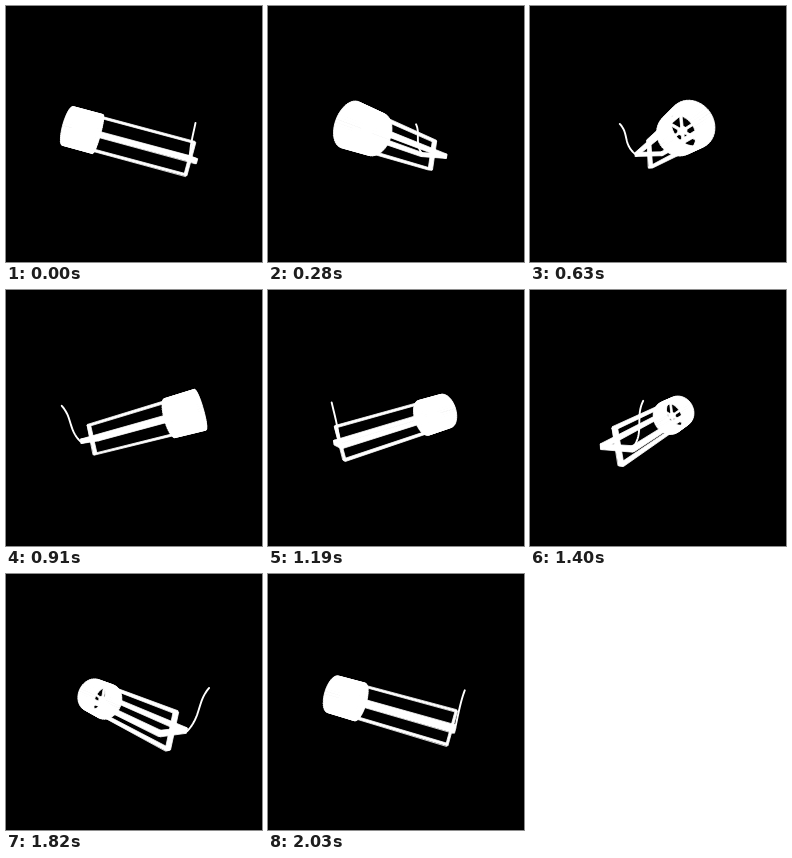
An HTML page with a canvas for the animation above (2100 ms loop, 256x256 px).

```html
<!DOCTYPE html>
<html lang="en">
<head>
<meta charset="utf-8">
<title>Rotating frame</title>
<style>
  html, body { margin: 0; width: 100%; height: 100%; overflow: hidden; background: #000; }
  canvas { display: block; width: 256px; height: 256px; }
</style>
</head>
<body>
<canvas id="stage" width="256" height="256"></canvas>
<script>
const ctx = document.getElementById('stage').getContext('2d');
const LOOP = 2100, STEP = 70, TURN = Math.PI * 2;
const CENTER = 128, CAMERA = 255;
const TILT = 15 * Math.PI / 180, COS = Math.cos(TILT), SIN = Math.sin(TILT);

// Axis coordinates (along, down, side) to world space.
const place = (s, v, w) => [-35 + s * COS - v * SIN, s * SIN + v * COS, 7 + w];

// Solid made of every combination of the given ranges.
function box([s0, s1], [v0, v1], [w0, w1]) {
  const points = [];
  for (const s of [s0, s1])
    for (const v of [v0, v1])
      for (const w of [w0, w1]) points.push(place(s, v, w));
  return points;
}

const polar = (s, r, a) => place(s, r * Math.sin(a), r * Math.cos(a));

function tube(start, end, outer, inner, count) {
  const parts = [];
  for (let i = 0; i < count; i++) {
    const points = [];
    for (const a of [i * TURN / count, (i + 1) * TURN / count])
      for (const s of [start, end])
        for (const r of [outer, inner]) points.push(polar(s, r, a));
    parts.push(points);
  }
  return parts;
}

function spoke(s, length, half, angle) {
  const dx = Math.cos(angle), dy = Math.sin(angle), points = [];
  for (const l of [-length, length])
    for (const h of [-half, half])
      for (const d of [-0.5, 0.5])
        points.push(place(s + d, l * dy + h * dx, l * dx - h * dy));
  return points;
}

function disc(s, depth, r) {
  const points = [];
  for (let i = 0; i < 16; i++)
    for (const d of [-depth, depth]) points.push(polar(s + d, r, i * TURN / 16));
  return points;
}

// A flat strap bent into a U: two legs and a crossbar.
function strap(end, upright) {
  const wide = [-2.3, 2.3], reach = [-16.6, 16.6], bar = [end - 1, end + 1];
  const make = (s, across) => upright ? box(s, across, wide) : box(s, wide, across);
  return [
    make([-12, end], [-17.4, -15.4]),
    make([-12, end], [15.4, 17.4]),
    make(bar, reach)
  ];
}

const solids = [
  ...tube(-30, 0, 19.5, 17.4, 48),
  ...[0.5, 1.5, 2.5].map(k => spoke(-10, 18, 1, k * Math.PI / 3)),
  disc(-10, 2.5, 3.2),
  ...strap(92.5, true),
  ...strap(94.5, false)
];

const wireKeys = [[58, 25, -9], [61.5, 12, -25], [63, 0, -16], [68, -12.3, -27]];
const wire = Array.from({ length: 25 }, (_, i) => {
  const t = i / 24, u = 1 - t;
  const weights = [u * u * u, 3 * u * u * t, 3 * u * t * t, t * t * t];
  return [0, 1, 2].map(axis => wireKeys.reduce((sum, p, k) => sum + p[axis] * weights[k], 0));
});

function projector(angle) {
  const c = Math.cos(angle), s = Math.sin(angle);
  return ([x, y, z]) => {
    const scale = CAMERA / (CAMERA + x * s - z * c);
    return [CENTER + (x * c + z * s) * scale, CENTER + y * scale];
  };
}

function hull(points) {
  const sorted = points.slice().sort((a, b) => a[0] - b[0] || a[1] - b[1]);
  const half = list => {
    const out = [];
    for (const p of list) {
      while (out.length > 1) {
        const [a, b] = out.slice(-2);
        if ((b[0] - a[0]) * (p[1] - a[1]) - (b[1] - a[1]) * (p[0] - a[0]) > 0) break;
        out.pop();
      }
      out.push(p);
    }
    out.pop();
    return out;
  };
  return [...half(sorted), ...half(sorted.slice().reverse())];
}

function trace(points) {
  ctx.beginPath();
  points.forEach(p => ctx.lineTo(p[0], p[1]));
}

function draw(time) {
  const step = Math.floor((time % LOOP) / STEP);
  const project = projector(step * STEP / LOOP * TURN);
  ctx.fillStyle = '#000';
  ctx.fillRect(0, 0, 256, 256);
  ctx.fillStyle = ctx.strokeStyle = '#fff';
  ctx.lineJoin = ctx.lineCap = 'round';

  ctx.lineWidth = 0.8;
  for (const solid of solids) {
    trace(hull(solid.map(project)));
    ctx.closePath();
    ctx.fill();
    ctx.stroke();
  }

  ctx.lineWidth = 1.9;
  trace(wire.map(project));
  ctx.stroke();
}

function tick() {
  draw(performance.now());
  requestAnimationFrame(tick);
}
tick();
</script>
</body>
</html>
```
